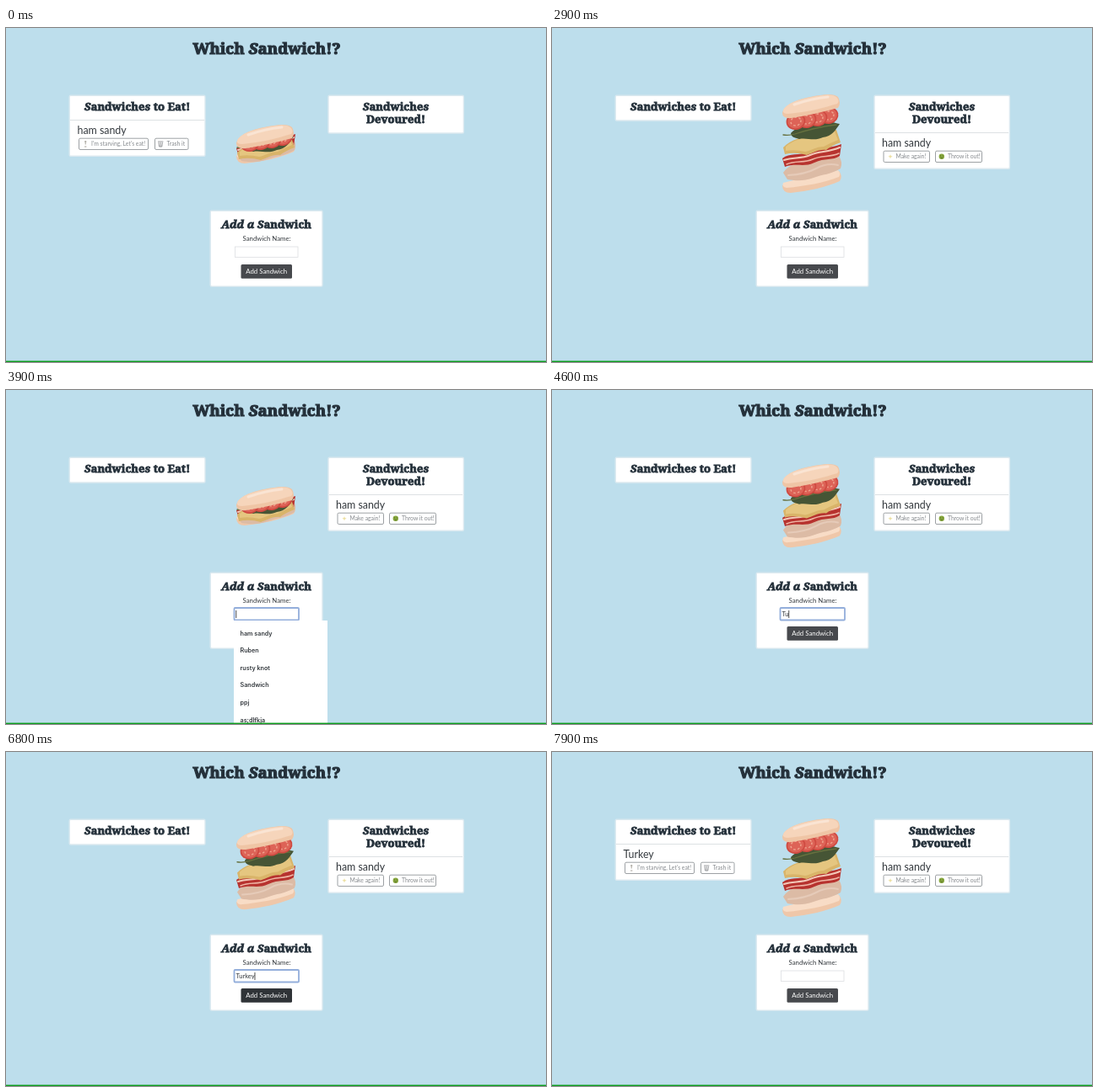
Write an HTML page that moves like this. It is 640 by 397 pixels and loops after 8000 ms.

```html
<!DOCTYPE html>
<html lang="en">
<head>
<meta charset="utf-8">
<title>Which Sandwich!?</title>
<style>
  html, body { margin: 0; width: 100%; height: 100%; overflow: hidden; background: #bddeec; }
  svg { display: block; width: 640px; height: 397px; font-family: Lato, "Open Sans", sans-serif; fill: #33383d; }
  .deco { font-family: "Noto Serif", "Liberation Serif", serif; font-weight: 900; font-size: 13.1px; text-anchor: middle; fill: #25313b; stroke: #25313b; stroke-width: .8; }
  .deco tspan { font-style: italic; }
  .title { font-size: 18.7px; stroke-width: 1.2; }
  .card { fill: #fff; stroke: #dbe9f0; stroke-width: 1.4; }
  .line { stroke: #dde1e3; }
  .item { font-size: 12.4px; }
  .btn rect { fill: #fff; stroke: #85898d; stroke-width: .8; }
  .btn text { font-size: 6.8px; fill: #85898d; }
  .btn.hover rect { fill: #343a40; stroke: #343a40; }
  .btn.hover text { fill: #fff; }
  .mid { text-anchor: middle; font-size: 7.8px; }
  .menu { font: 600 7.2px Inter, Roboto, sans-serif; }
</style>
</head>
<body>
<svg viewBox="0 0 640 397">
  <rect width="640" height="397" fill="#bddeec"/>
  <text class="deco title" x="309" y="31">Which <tspan>S</tspan>andwich!?</text>

  <rect class="card" id="eatCard" x="75.2" y="80.3" width="160.8" rx="1.5"/>
  <text class="deco" x="155.5" y="98"><tspan>S</tspan>andwiche<tspan>s</tspan> to Eat!</text>
  <g id="eatItem">
    <path class="line" d="M76 109.5H235"/>
    <text class="item" id="eatName" x="84.500" y="126.3"></text>
    <g class="btn" id="eatBtn">
      <rect x="86.5" y="131.2" width="82" height="13.3" rx="1.5"/>
      <path d="M93 135h2.4M94.2 134v4.5M93 141h2.4" stroke="#a8a49c" stroke-width="1" fill="none"/>
      <text x="101" y="140.2">I'm starving, Let's eat!</text>
    </g>
    <g class="btn">
      <rect x="176.5" y="131.2" width="39.5" height="13.3" rx="1.5"/>
      <path d="M180 135h6.4M181 136l.6 5h3.2l.6-5M183.2 136v5" stroke="#8d8f92" stroke-width=".9" fill="none"/>
      <text x="190.5" y="140.2">Trash it</text>
    </g>
  </g>

  <rect class="card" id="doneCard" x="382" y="80.3" width="160.4" rx="1.5"/>
  <text class="deco" x="462" y="98"><tspan>S</tspan>andwiche<tspan>s</tspan></text>
  <text class="deco" x="462" y="113">Devoured!</text>
  <g id="doneItem">
    <path class="line" d="M383 124.5H541"/>
    <text class="item" x="391" y="141.3">ham sandy</text>
    <g class="btn">
      <rect x="393" y="146.2" width="54.5" height="13.3" rx="1.5"/>
      <path d="M401 150l.7 2 2 .7-2 .7-.7 2-.7-2-2-.7 2-.7z" fill="#ecdfa0"/>
      <text x="407.5" y="155.2">Make again!</text>
    </g>
    <g class="btn">
      <rect x="454.5" y="146.2" width="55" height="13.3" rx="1.5"/>
      <circle cx="461.8" cy="152.7" r="3.2" fill="#86a63c"/>
      <path d="M460 152h1M462.8 152h1M460.6 154.3h2.6" stroke="#4d6823" stroke-width=".8"/>
      <text x="469" y="155.2">Throw it out!</text>
    </g>
  </g>

  <g id="layers"></g>

  <rect class="card" x="242.2" y="217.3" width="132.8" height="89.8" rx="1.5"/>
  <text class="deco" x="308.7" y="238"><tspan font-style="normal">Add a </tspan><tspan>S</tspan>andwich</text>
  <text class="mid" x="309" y="253">Sandwich Name:</text>
  <rect id="field" fill="#fff"/>
  <text id="typed" x="272.5" y="269" font-size="7.6"></text>
  <path id="caret" stroke="#222" stroke-width=".8"/>
  <rect id="add" x="278.5" y="281" width="60.5" height="16.7" rx="1.5"/>
  <text class="mid" x="308.7" y="292" style="fill:#fff">Add Sandwich</text>

  <g id="menu" class="menu">
    <rect x="270" y="274" width="111" height="130" fill="#fff"/>
  </g>
  <rect y="395.6" width="640" height="1.4" fill="#0b9c1c"/>
</svg>

<script>
const LOOP = 8000, CYCLE = 2200;
const SENT = 2800, SAVED = 7700;          // page reloads
const $ = id => document.getElementById(id);
const NS = 'http://www.w3.org/2000/svg';
const set = (el, attrs) => { for (const k in attrs) el.setAttribute(k, attrs[k]); };
const show = (el, on) => { el.style.display = on ? '' : 'none'; };
const clamp = v => Math.min(1, Math.max(0, v));
const shape = (d, fill) => `<path d="${d}" fill="${fill}"/>`;
const stroke = (d, color, w) =>
  `<path d="${d}" fill="none" stroke="${color}" stroke-width="${w}" stroke-linecap="round"/>`;

const tomato = [[328, 104], [315, 107], [302, 109], [289, 111]].map(([x, y]) =>
  `<g transform="translate(${x} ${y}) rotate(-14)">
    <ellipse rx="11.5" ry="10" fill="#cf4a41"/>
    <ellipse rx="9.8" ry="8.2" fill="#dd6357"/>
    <ellipse rx="6" ry="5" fill="none" stroke="#efa48e" stroke-width="1.5" stroke-dasharray="2.5 2.5"/>
  </g>`).join('');

// Bottom to top: drawing, then shift when squeezed, before and after the turn
const layers = [
  [shape('M273 187C290 181 320 176 340 170Q345 176 341 182C326 189 303 194 283 196Q273 196 273 187Z', '#efc7a9') +
   shape('M274 184C292 179 318 175 339 169Q343 173 340 177C322 184 300 188 278 190Q272 189 274 184Z', '#f8dcc6'), -35, -35],
  [shape('M274 172C280 162 296 158 308 154C320 149 333 150 340 152Q345 160 342 167C331 174 320 174 310 178C297 183 286 181 279 180Z', '#dcbba5') +
   stroke('M280 175Q300 174 313 167T339 163', '#e6cbb9', 2), -20, -22],
  [shape('M273 155C282 148 292 152 304 147C316 140 329 144 343 138L341 152C333 158 323 154 311 160C299 166 289 160 276 165Z', '#b7332f') +
   stroke('M275 157C286 153 295 156 306 151S327 148 341 142', '#f3c9b9', 2) +
   stroke('M278 162C289 157 298 161 309 156S329 154 340 149', '#efb5a5', 1.5), -12, -12],
  [shape('M274 142C283 132 297 131 306 125Q323 119 337 121L342 136Q331 140 325 145C315 144 309 149 302 151Q288 147 276 150Z', '#d9b469') +
   shape('M277 141C286 133 298 131 307 126Q323 121 335 123L339 133Q329 137 322 141C313 141 306 146 300 147Q288 144 277 146Z', '#e5c680'), -7, 6],
  [shape('M283 125C289 119 297 114 308 111C321 107 331 112 341 114C336 121 332 129 321 130C311 135 302 130 293 132C287 130 284 130 283 125Z', '#465535') +
   stroke('M274 127Q281 128 288 126Q312 118 337 115', '#66713f', 1.3), 12, 15],
  [tomato, 27, 26],
  [shape('M273 101C275 91 290 85 306 82C320 79 334 77 339 82Q343 89 339 95C324 99 303 104 284 107Q273 108 273 101Z', '#efc5a5') +
   shape('M274 98C278 89 293 85 308 82C322 79 334 78 338 83Q341 87 338 90C322 95 302 100 280 102Q273 102 274 98Z', '#f6d5bb') +
   stroke('M287 91Q307 84 327 82', '#fae4d3', 3), 33, 36]
].map(([art, before, after]) => {
  const g = document.createElementNS(NS, 'g');
  g.innerHTML = art;
  $('layers').append(g);
  return { g, before, after };
});

['ham sandy', 'Ruben', 'rusty knot', 'Sandwich', 'ppj', 'as;dlfkja'].forEach((word, i) => {
  const text = document.createElementNS(NS, 'text');
  set(text, { x: 277.5, y: 291.5 + i * 20.6 });
  text.textContent = word;
  $('menu').append(text);
});

function drawSandwich(t) {
  const loaded = t < SENT ? -1300 : t < SAVED ? SENT : SAVED;
  const phase = (t - loaded) / CYCLE % 1;
  const open = clamp(0.5 + 0.6 * Math.cos(phase * 2 * Math.PI));
  const turn = clamp((phase - 0.41) / 0.09);
  for (const { g, before, after } of layers) {
    const dy = (before + (after - before) * turn) * (1 - open);
    set(g, { transform: `translate(0 ${dy.toFixed(2)})` });
  }
}

function drawLists(t) {
  const sent = t >= SENT, eat = !sent || t >= SAVED;
  set($('eatCard'), { height: eat ? 72 : 29.7 });
  show($('eatItem'), eat);
  $('eatName').textContent = sent ? 'Turkey' : 'ham sandy';
  $('eatBtn').classList.toggle('hover', t >= 2500 && t < SENT);
  set($('doneCard'), { height: sent ? 86.9 : 44.7 });
  show($('doneItem'), sent);
}

function drawForm(t) {
  const focus = t >= 1300 && t < 2500 || t >= 3800 && t < SAVED;
  set($('field'), focus
    ? { x: 270.5, y: 259, width: 76.5, height: 14.5, rx: 1, stroke: '#93aedb', 'stroke-width': 1.8 }
    : { x: 271.5, y: 260, width: 74.5, height: 12.5, rx: 0, stroke: '#dcdfe1', 'stroke-width': 0.8 });
  const count = t < 4400 || t >= SAVED ? 0 : Math.min(6, 1 + Math.floor((t - 4400) / 170));
  const typed = $('typed');
  typed.textContent = 'Turkey'.slice(0, count);
  const x = 272.8 + (count ? typed.getComputedTextLength() : 0);
  set($('caret'), { d: `M${x} 262V271` });
  show($('caret'), focus && t % 1000 >= 500);
  set($('add'), { fill: t >= 6500 && t < SAVED ? '#2f3337' : '#47494d' });
  show($('menu'), t >= 3800 && t < 4400);
}

function frame() {
  const t = performance.now() % LOOP;
  drawSandwich(t);
  drawLists(t);
  drawForm(t);
  requestAnimationFrame(frame);
}
frame();
</script>
</body>
</html>
```
